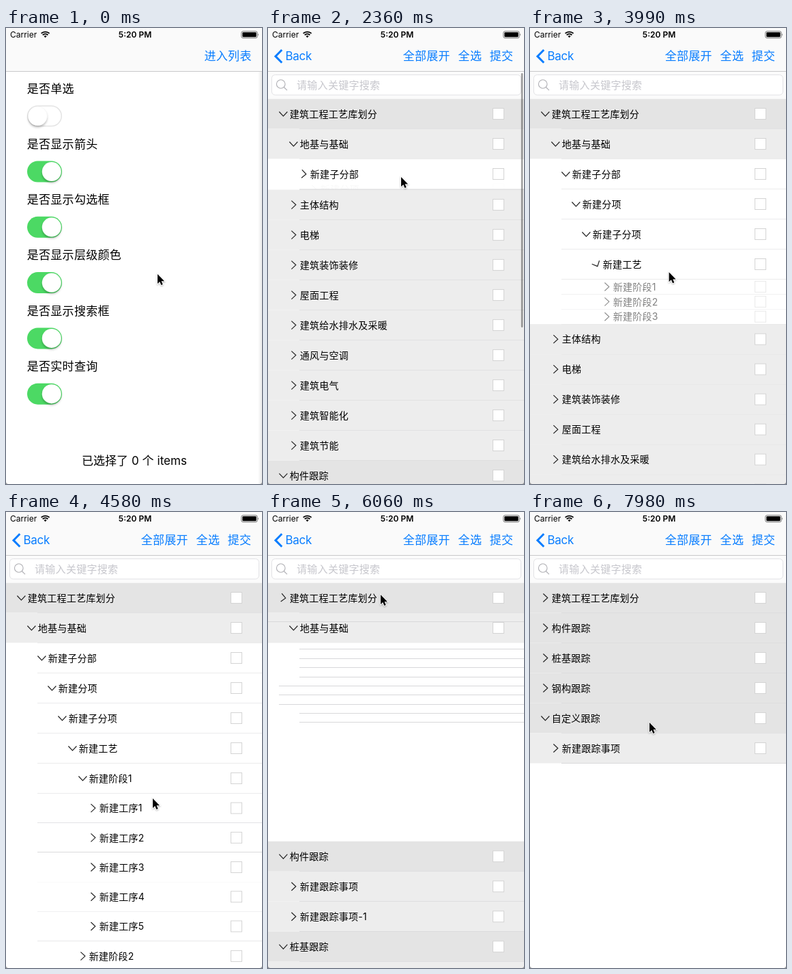
Recreate the animation shown at these times as an HTML page. Size 375 by 667 pixels, loop 8000 ms.

```html
<!DOCTYPE html>
<html lang="zh-CN">
<head>
<meta charset="utf-8">
<title>Tree list</title>
<style>
  html, body { margin: 0; width: 100%; height: 100%; overflow: hidden; background: #fff; }
  svg { display: block; width: 375px; height: 667px; }
  text { font-family: Inter, "Noto Sans CJK SC", sans-serif; white-space: pre; }
  .row { font-size: 14px; letter-spacing: .24px; }
  .big { font-size: 17px; letter-spacing: .3px; }
  .blue { fill: #087dff; }
</style>
</head>
<body>
<svg id="stage" viewBox="0 0 375 667">
  <defs>
    <filter id="soft" x="-50%" y="-50%" width="200%" height="200%">
      <feDropShadow dx="0" dy="2.5" stdDeviation="1.6" flood-opacity=".26"/>
    </filter>
    <filter id="lift" x="-50%" y="-50%" width="200%" height="200%">
      <feDropShadow dx="0" dy="1" stdDeviation=".8" flood-opacity=".35"/>
    </filter>
    <linearGradient id="edge"><stop stop-opacity="0"/><stop offset="1" stop-opacity=".09"/></linearGradient>
  </defs>
  <rect width="375" height="667" fill="#fff"/>

  <g id="options">
    <rect width="375" height="667" fill="#fff"/>
    <text class="big" x="188" y="639" text-anchor="middle" style="letter-spacing:.05px">已选择了 0 个 items</text>
  </g>
  <rect id="dim" width="375" height="667"/>

  <g id="list">
    <rect x="-6" y="64" width="6" height="603" fill="url(#edge)"/>
    <rect width="375" height="667" fill="#fff"/>
    <g id="rows"></g>
    <rect y="64" width="375" height="39.5" fill="#fbfbfb"/>
    <rect x="5.5" y="68.5" width="365" height="29.5" rx="5" fill="#fff" stroke="#e2e2e5"/>
    <g fill="none" stroke="#aeaeb3" stroke-width="1.1">
      <circle cx="18.8" cy="82" r="6.3"/><path d="M23.3 86.5L28 91.2"/>
    </g>
    <text x="42" y="89.2" font-size="15" letter-spacing=".3" fill="#c7c7cd">请输入关键字搜索</text>
    <rect id="bar" x="370.8" y="66" width="2.6" height="372" rx="1.3" fill-opacity=".38"/>
  </g>

  <rect width="375" height="63.5" fill="#fafafa"/>
  <rect y="63" width="375" height="1" fill="#c9c9cb"/>
  <text x="6" y="13.8" font-size="12">Carrier</text>
  <g fill="none" stroke="#000" stroke-width="1.9">
    <path d="M51.6 7.9A9 9 0 0 1 63.6 7.9"/><path d="M53.8 10.3A5.6 5.6 0 0 1 61.4 10.3"/>
  </g>
  <path d="M55.6 12A3 3 0 0 1 59.6 12L57.6 14.2Z"/>
  <text x="189" y="13.8" font-size="12" font-weight="600" text-anchor="middle">5:20 PM</text>
  <rect x="344.8" y="4.8" width="23.4" height="9.9" rx="2.4" fill="none" stroke="#555" stroke-width=".8"/>
  <rect x="346.3" y="6.2" width="20.4" height="7.1" rx="1.2"/>
  <path d="M369.3 8Q371 9.7 369.3 11.5Z" fill="#555"/>

  <text id="enter" class="big blue" x="290.5" y="47.4">进入列表</text>
  <g id="tools" class="big blue">
    <path d="M20.3 32L11 41.4L20.3 50.8" fill="none" stroke="#087dff" stroke-width="3"/>
    <text id="back" x="25.5" y="47.4" style="letter-spacing:-.3px">Back</text>
    <text x="197.7" y="47.4">全部展开</text>
    <text x="278.6" y="47.4">全选</text>
    <text x="324.8" y="47.4">提交</text>
  </g>

  <path d="M0 663.5Q0 667 3.5 667H0ZM375 663.5Q375 667 371.5 667H375Z" fill="#888"/>
  <path id="cursor" d="M0 0V14L3.2 11.1L5.4 16L7.7 15L5.6 10.2H10Z"
    stroke="#fff" stroke-width="1.6" paint-order="stroke" filter="url(#lift)"/>
</svg>

<script>
const LOOP = 8000, FIRST = 292, STEP = 147.5;
const ROW = 44, TOP = 103.5, FOLD = 300, TURN = 230;
const PUSH = 973;

const $ = id => document.getElementById(id);
function el(tag, attrs, parent, text) {
  const e = document.createElementNS('http://www.w3.org/2000/svg', tag);
  for (const k in attrs) e.setAttribute(k, attrs[k]);
  if (text) e.textContent = text;
  parent.append(e);
  return e;
}
const set = (e, attrs) => { for (const k in attrs) e.setAttribute(k, attrs[k]); };
const clamp = x => Math.min(1, Math.max(0, x));
const ease = x => (1 - Math.cos(Math.PI * clamp(x))) / 2;

// Options page
['是否单选', '是否显示箭头', '是否显示勾选框', '是否显示层级颜色', '是否显示搜索框', '是否实时查询'].forEach((label, i) => {
  const y = 88.3 + i * 81.27, on = i > 0, page = $('options');
  el('text', { class: 'big', x: 30.7, y: y + 6.3 }, page, label);
  el('rect', on
    ? { x: 31, y: y + 25, width: 51, height: 31, rx: 15.5, fill: '#4cd964' }
    : { x: 31.75, y: y + 25.75, width: 49.5, height: 29.5, rx: 14.75, fill: '#fff', stroke: '#e4e4e4', 'stroke-width': 1.5 }, page);
  el('circle', { cx: on ? 66.8 : 46.3, cy: y + 40.5, r: 14, fill: '#fff', filter: 'url(#soft)',
    stroke: '#000', 'stroke-opacity': .06, 'stroke-width': .5 }, page);
});

// Tree: kids === null marks a leaf; open and close are click times
const NEVER = 1e6;
const node = (name, kids = [], open = -NEVER, close = NEVER) =>
  ({ name, kids, open: kids && kids.length ? open : NEVER, close });
const items = () => [node('新建跟踪事项'), node('新建跟踪事项-1')];
const steps = [1, 2, 3, 4, 5].map(i => i > 1
  ? node('新建工序' + i)
  : node('新建工序1', [1, 2, 3].map(k => node('新建工步' + k, null)), 4859));
const stages = [node('新建阶段1', steps, 4295), node('新建阶段2'), node('新建阶段3')];
const base = node('地基与基础', [
  node('新建子分部', [
    node('新建分项', [
      node('新建子分项', [node('新建工艺', stages, 3830)], 3300)
    ], 2830)
  ], 2327)
], 1870);
const parts = ['主体结构', '电梯', '建筑装饰装修', '屋面工程', '建筑给水排水及采暖',
  '通风与空调', '建筑电气', '建筑智能化', '建筑节能'].map(n => node(n));
const tree = [
  node('建筑工程工艺库划分', [base, ...parts], undefined, 5856),
  node('构件跟踪', items(), undefined, 6570),
  node('桩基跟踪', items(), undefined, 7000),
  node('钢构跟踪', items(), undefined, 7446),
  node('自定义跟踪', [node('新建跟踪事项')])
];

function build(n, level) {
  const x = 15 * level;
  n.g = el('g', {}, $('rows'));
  n.bg = el('rect', { width: 375, fill: ['#e4e4e4', '#ededed'][level] || '#fff' }, n.g);
  n.body = el('g', {}, n.g);
  if (n.kids) n.arrow = el('path', { d: 'M-3 -6L3.4 0L-3 6', fill: 'none', stroke: '#222', 'stroke-width': 1.2 }, n.body);
  n.arrowX = 22.4 + x;
  el('text', { class: 'row', x: 31.8 + x, y: 5.2 }, n.body, n.name);
  el('rect', { x: 329.5, y: -8, width: 16, height: 16, fill: '#fff', stroke: '#d4d4d4' }, n.body);
  n.line = el('rect', { height: 1, fill: '#d8d8da' }, n.g);
  n.inset = n.kids ? 46 : 16;
  (n.kids || []).forEach(k => build(k, level + 1));
}
tree.forEach(n => build(n, 0));

const openness = (n, t, span) => ease((t - n.open) / span) - ease((t - n.close) / span);

// Places a row and its children, returns the next y
function place(n, y, scale, t, fold) {
  const h = ROW * scale;
  let show = scale > .001 && y < 667, first = false;
  if (fold) {
    first = fold.count === 0;
    const startY = fold.y + ROW * fold.count++;
    show = show && (first || (startY < 667 && y + h > fold.y + ROW));
  }
  n.g.style.display = show ? '' : 'none';
  if (show) {
    const full = first ? ROW : h, bare = fold && !first;
    set(n.g, { transform: `translate(0 ${y})` });
    set(n.bg, { height: bare ? 0 : full });
    set(n.body, { transform: `translate(0 ${full / 2})`, opacity: bare ? 0 : first ? 1 : scale });
    const inset = first ? 0 : n.inset;
    set(n.line, { x: inset, width: 375 - inset, y: Math.round(y + h - .5) - y });
    if (n.arrow) set(n.arrow, { transform: `translate(${n.arrowX} 0) rotate(${90 * openness(n, t, TURN)})` });
  }
  y += h;
  const folding = fold || (t > n.close ? { y, count: 0 } : null);
  const inner = scale * openness(n, t, FOLD);
  for (const k of n.kids || []) y = place(k, y, inner, t, folding);
  return y;
}

const path = [
  [200, 222, 360], [740, 325, 45], [1400, 325, 45], [1780, 200, 168], [1950, 200, 168],
  [2200, 195, 218], [2400, 195, 218], [2700, 190, 256], [2860, 190, 256], [3150, 185, 299],
  [3320, 185, 299], [3640, 200, 344], [3850, 200, 344], [4200, 212, 388], [4300, 212, 388],
  [4569, 215, 419], [4800, 216, 433], [5350, 216, 433], [5800, 165, 121], [6100, 165, 121],
  [6400, 168, 166], [6580, 168, 166], [6880, 172, 212], [7020, 172, 212], [7320, 174, 256],
  [7460, 174, 256], [7660, 175, 300], [7800, 175, 308], [8000, 175, 308]
];
function cursorAt(t) {
  const i = path.findIndex(p => p[0] > t);
  if (i < 1) return path[0].slice(1);
  const a = path[i - 1], b = path[i], e = ease((t - a[0]) / (b[0] - a[0]));
  return [a[1] + (b[1] - a[1]) * e, a[2] + (b[2] - a[2]) * e];
}

function pushAt(t) {
  const k = Math.max(0, t - PUSH) * .017;
  return k > 8.5 ? 1 : 1 - (1 + k) * Math.exp(-k);
}

function draw(t) {
  const p = pushAt(t);
  set($('options'), { transform: `translate(${-112.5 * p} 0)` });
  set($('dim'), { opacity: .075 * p });
  set($('list'), { transform: `translate(${375 * (1 - p)} 0)` });
  set($('enter'), { opacity: (1 - p) ** 1.5 });
  set($('tools'), { opacity: p });
  set($('back'), { x: 25.5 + 50 * (1 - p) });
  set($('bar'), { opacity: clamp((t - 1200) / 150) - clamp((t - 2500) / 250) });
  let y = TOP;
  for (const n of tree) y = place(n, y, 1, t, null);
  set($('cursor'), { transform: `translate(${cursorAt(t)})` });
}

// The screen refreshes in regular steps
const start = performance.now();
function tick() {
  const t = (performance.now() - start) % LOOP;
  draw(t < FIRST ? 0 : FIRST + Math.floor((t - FIRST) / STEP) * STEP);
  requestAnimationFrame(tick);
}
tick();
</script>
</body>
</html>
```
